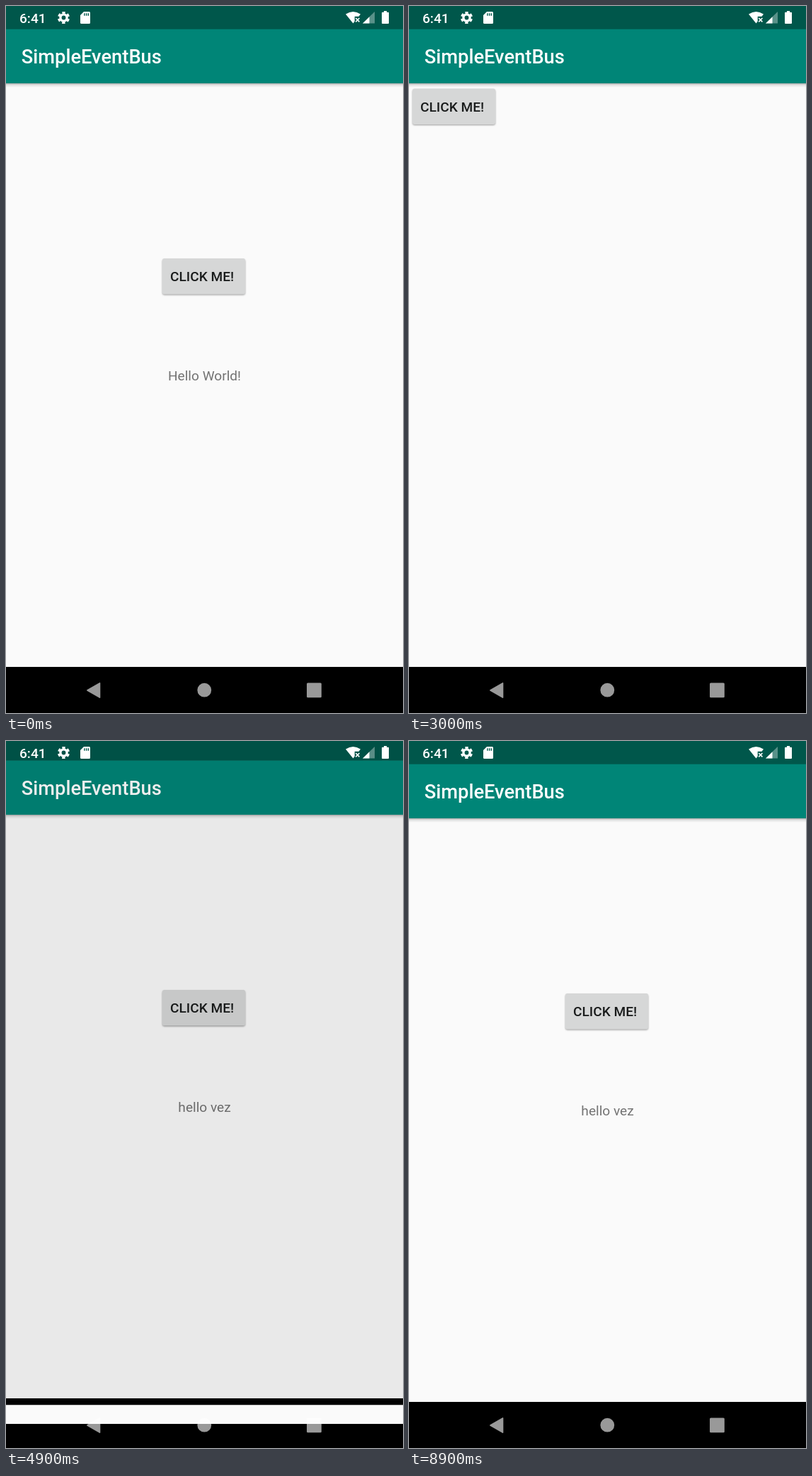
Write an HTML page that moves like this. It is 561x997 px and loops after 9000 ms.

```html
<!DOCTYPE html>
<html lang="en">
<head>
<meta charset="utf-8">
<title>Event bus demo</title>
<style>
  html, body { margin: 0; width: 100%; height: 100%; overflow: hidden; background: #000; }
  svg { display: block; width: 561px; height: 997px; font-family: Roboto, "Noto Sans", sans-serif; }
  .medium { font-weight: 500; }
</style>
</head>
<body>
<svg viewBox="0 0 561 997">
  <defs>
    <linearGradient id="shade" x2="0" y2="1">
      <stop offset="0" stop-opacity=".32"/>
      <stop offset=".4" stop-opacity=".1"/>
      <stop offset="1" stop-opacity="0"/>
    </linearGradient>
    <filter id="blur" x="-10%" y="-20%" width="120%" height="140%"><feGaussianBlur stdDeviation="1.3"/></filter>
    <clipPath id="reveal"><rect id="revealRect" width="561" height="997"/></clipPath>
    <g id="chrome">
      <rect width="561" height="997"/>
      <rect y="32" width="561" height="900" fill="#fafafa"/>
      <rect y="109" width="561" height="6" fill="url(#shade)"/>
      <rect width="561" height="33" fill="#00574b"/>
      <rect y="32.7" width="561" height="76.3" fill="#008577"/>
      <text class="medium" x="21.8" y="81" font-size="27.3" fill="#fff">SimpleEventBus</text>
    </g>
    <g id="button">
      <rect y="1.5" width="117" height="50" rx="3" fill-opacity=".38" filter="url(#blur)"/>
      <rect width="117" height="50.4" rx="2.7" fill="#d6d7d7"/>
    </g>
    <g id="label">
      <text class="medium" x="11" y="32.3" font-size="19.1" fill="#191b1b">CLICK ME!</text>
    </g>
  </defs>

  <rect width="561" height="997"/>
  <g id="first">
    <use href="#chrome"/>
    <g transform="translate(221 356)">
      <use href="#button"/>
      <rect id="firstRipple" width="117" height="50.4" rx="2.7"/>
      <use href="#label"/>
    </g>
    <text id="message" x="280.5" y="528.3" font-size="19.1" text-anchor="middle" fill="#737373"></text>
  </g>
  <g id="second" clip-path="url(#reveal)">
    <use href="#chrome"/>
    <g transform="translate(5 116.6)">
      <use href="#button"/>
      <rect id="secondRipple" width="117" height="50.4" rx="2.7"/>
      <use href="#label"/>
    </g>
  </g>

  <g fill="#fff">
    <text class="medium" x="19" y="23.7" font-size="19.1">6:41</text>
    <g transform="translate(81.5 16.5)" fill="none" stroke="#fff">
      <circle r="4.6" stroke-width="3.4"/>
      <circle r="7.2" stroke-width="2.8" stroke-dasharray="4.2 3.34" transform="rotate(-106.7)"/>
    </g>
    <path d="M110 8h7.5q1.5 0 1.5 1.5v14q0 1.5-1.5 1.5h-11q-1.5 0-1.5-1.5V13z"/>
    <path d="M110.9 10.2v3.6m2.7-3.6v3.6m2.7-3.6v3.6" stroke="#00574b" stroke-width="1.4"/>
    <path d="M480 11.5Q490.5 4.5 501 11.5L498.5 14.7H492.7V21.8L490.5 24.5z"/>
    <path d="M494.2 17l5.2 5.4m0-5.4l-5.2 5.4" stroke="#fff" stroke-width="1.6"/>
    <path d="M521 8V24.5H504z" opacity=".35"/>
    <path d="M504 24.5L513.5 15.3V24.5z"/>
    <path d="M534 7h4v1.7h2q1 0 1 1V24q0 1-1 1h-8q-1 0-1-1V9.700q0-1 1-1h2z"/>
  </g>
  <g fill="#fff" opacity=".6">
    <path d="M114.500 964.300L132 954.200q1.300-.6 1.300.8v20q0 1.400-1.300.8L114.500 965.700q-1-.7 0-1.400z"/>
    <circle cx="280.300" cy="964.700" r="9.900"/>
    <rect x="425" y="954.500" width="20.800" height="20.800" rx="1.500"/>
  </g>
</svg>
<script>
const LOOP = 9000, STEP = 100, HEIGHT = 997;
const OPEN_AT = 1834, CLOSE_AT = 4693, DURATION = 425;
const WINDOW_TRAVEL = 0.041 * HEIGHT, BACK_TRAVEL = 0.021 * HEIGHT, CLIP_TRAVEL = 0.959 * HEIGHT;

const $ = id => document.getElementById(id);
const clamp = v => Math.min(1, Math.max(0, v));

// Cubic easing segment from (x0, y0) to (x3, y3), solved for x by bisection.
function bezier(x0, y0, x1, y1, x2, y2, x3, y3) {
  const at = (u, a, b, c, d) =>
    a * (1 - u) ** 3 + 3 * b * u * (1 - u) ** 2 + 3 * c * u * u * (1 - u) + d * u ** 3;
  return x => {
    let low = 0, high = 1;
    for (let i = 0; i < 24; i++) {
      const mid = (low + high) / 2;
      if (at(mid, x0, x1, x2, x3) < x) low = mid; else high = mid;
    }
    return at((low + high) / 2, y0, y1, y2, y3);
  };
}

const slideEase = bezier(0, 0, 0.4, 0, 0.2, 1, 1, 1);
const dimEase = bezier(0, 0, 0.33, 0, 1, 1, 1, 1);
const clipStart = bezier(0, 0, 0.05, 0, 0.1333, 0.06, 0.1667, 0.4);
const clipEnd = bezier(0.1667, 0.4, 0.2083, 0.82, 0.25, 1, 1, 1);
const clipEase = x => x < 0.1667 ? clipStart(x) : clipEnd(x);

// Ripple strength after a touch: quick rise, then fade.
function ripple(elapsed) {
  if (elapsed < 0) return 0;
  return 0.12 * clamp(elapsed / 210) * clamp((460 - elapsed) / 230);
}

function render(t) {
  const closing = t >= CLOSE_AT;
  const p = clamp((t - (closing ? CLOSE_AT : OPEN_AT)) / DURATION);
  const slide = closing ? 1 - slideEase(p) : slideEase(p);
  const clip = closing ? clipEase(p) : 1 - clipEase(p);
  const alpha = closing ? 0.9 + 0.1 * dimEase(p) : 1 - 0.1 * clamp(p * DURATION / 217);
  const active = t >= OPEN_AT && t < CLOSE_AT + DURATION;

  $('first').setAttribute('transform', `translate(0 ${active ? -BACK_TRAVEL * slide : 0})`);
  $('first').setAttribute('opacity', active ? alpha : 1);
  $('second').setAttribute('visibility', active ? 'visible' : 'hidden');
  $('second').setAttribute('transform', `translate(0 ${WINDOW_TRAVEL * (1 - slide)})`);
  $('revealRect').setAttribute('y', CLIP_TRAVEL * clip);
  $('firstRipple').setAttribute('fill-opacity', ripple(t - OPEN_AT + 100));
  $('secondRipple').setAttribute('fill-opacity', ripple(t - CLOSE_AT + 100));
  $('message').textContent = closing ? 'hello vez' : 'Hello World!';
}

const start = performance.now();
function tick() {
  const elapsed = (performance.now() - start) % LOOP;
  render(Math.floor(elapsed / STEP) * STEP);
  requestAnimationFrame(tick);
}
tick();
</script>
</body>
</html>
```
